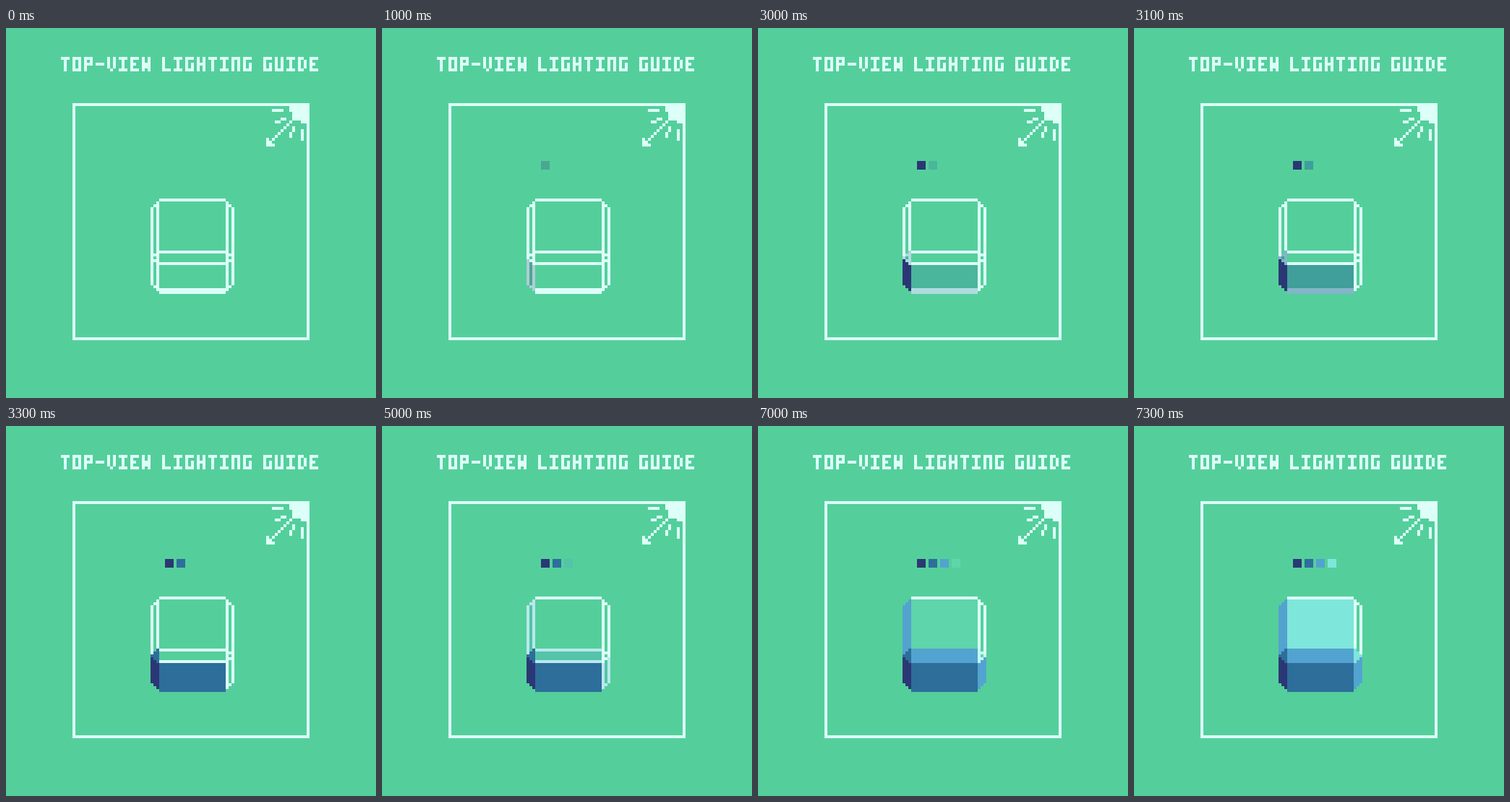
Animation, 512 px wide and 512 px high, one loop 8 s. Source, as an HTML page with a canvas:

```html
<!DOCTYPE html>
<html lang="en">
<head>
<meta charset="utf-8">
<title>Top-view lighting guide</title>
<style>
  html, body { margin: 0; width: 100%; height: 100%; overflow: hidden; background: #54cf9b; }
  canvas { display: block; width: 100vmin; height: 100vmin; image-rendering: pixelated; }
</style>
</head>
<body>
<canvas id="stage" width="512" height="512" role="img" aria-label="TOP-VIEW LIGHTING GUIDE"></canvas>
<script>
const ctx = document.getElementById('stage').getContext('2d');
const CELL = 4, LOOP = 8000, FADE_STEP = 100, FADE_STEPS = 4;
const GREEN = '#54cf9b', WHITE = '#dcfff8';

// Tiny 3x5 font: one octal digit per row, high bit on the left.
const FONT = {
  T: '72222', O: '75557', P: '75744', '-': '00700', V: '55552',
  I: '72227', E: '74647', W: '55775', L: '44447', G: '74557',
  H: '55755', N: '75555', U: '55557', D: '65556'
};

// All coordinates are in cells of the 128 x 128 grid.
function rect(x, y, w = 1, h = 1) {
  ctx.fillRect(x * CELL, y * CELL, w * CELL, h * CELL);
}

function text(str, x, y) {
  for (const ch of str) {
    if (ch === ' ') { x += 3; continue; }
    [...FONT[ch]].forEach((row, j) => {
      for (let i = 0; i < 3; i++) if (row & (4 >> i)) rect(x + i, y + j);
    });
    x += 4;
  }
}

function border(x, y, size) {
  rect(x, y, size);
  rect(x, y + size - 1, size);
  rect(x, y, 1, size);
  rect(x + size - 1, y, 1, size);
}

function sun() {
  rect(98, 26, 7, 3);
  rect(99, 29, 6, 3);
  rect(102, 32, 3);
  // Each ray is mirrored across the corner diagonal.
  for (const [x, y, len] of [[92, 28, 4], [95, 31, 2], [93, 32, 2]]) {
    rect(x, y, len);
    rect(y + 76 - 2 * (y - 26) + 2 - 0 * len, 131 - x - len, 1, len);
  }
  for (let i = 0; i < 8; i++) rect(98 - i, 32 + i);
  for (let i = 0; i < 3; i++) rect(90, 38 + i, i + 1);
}

function outline() {
  rect(53, 59, 23);
  rect(53, 77, 23);
  rect(53, 81, 23);
  rect(53, 90, 23, 2);
  for (const side of [-1, 1]) {
    const put = (d, y, h) => rect(64 + side * d, y, 1, h);
    put(12, 60, 31);
    put(13, 61, 1);
    put(13, 78, 1);
    put(13, 80, 1);
    put(13, 89, 1);
    put(14, 62, 27);
  }
}

// Slanted side face, three columns wide, moving down towards the middle or away.
function slant(x, dir, y, h) {
  for (let i = 0; i < 3; i++) rect(x + i, y + dir * i, 1, h);
}

// Triangular bevel pointing away from the middle.
function bevel(x, dir) {
  for (let i = 0; i < 3; i++) rect(x + dir * i, 77 + i, 1, 5 - 2 * i);
}

const shades = [
  { start: 1000, color: '#2b3775', paint() { slant(50, 1, 80, 9); } },
  { start: 3000, color: '#2d6e9b', paint() { rect(53, 82, 23, 10); bevel(52, -1); } },
  { start: 5000, color: '#53a3d0', paint() {
    slant(50, -1, 62, 17);
    rect(53, 77, 23, 5);
    slant(76, -1, 82, 9);
  } },
  { start: 7000, color: '#7ee6da', paint() { rect(53, 60, 23, 17); bevel(76, 1); } }
];

function draw(t) {
  ctx.globalAlpha = 1;
  ctx.fillStyle = GREEN;
  ctx.fillRect(0, 0, 512, 512);
  ctx.fillStyle = WHITE;
  text('TOP-VIEW LIGHTING GUIDE', 19, 10);
  border(23, 26, 82);
  sun();
  outline();
  shades.forEach((s, i) => {
    if (t < s.start) return;
    const step = Math.floor((t - s.start) / FADE_STEP) + 1;
    ctx.globalAlpha = Math.min(1, step / FADE_STEPS);
    ctx.fillStyle = s.color;
    rect(55 + 4 * i, 46, 3, 3);
    s.paint();
  });
}

const begin = performance.now();
function tick() {
  draw((performance.now() - begin) % LOOP);
  requestAnimationFrame(tick);
}
tick();
</script>
</body>
</html>
```
